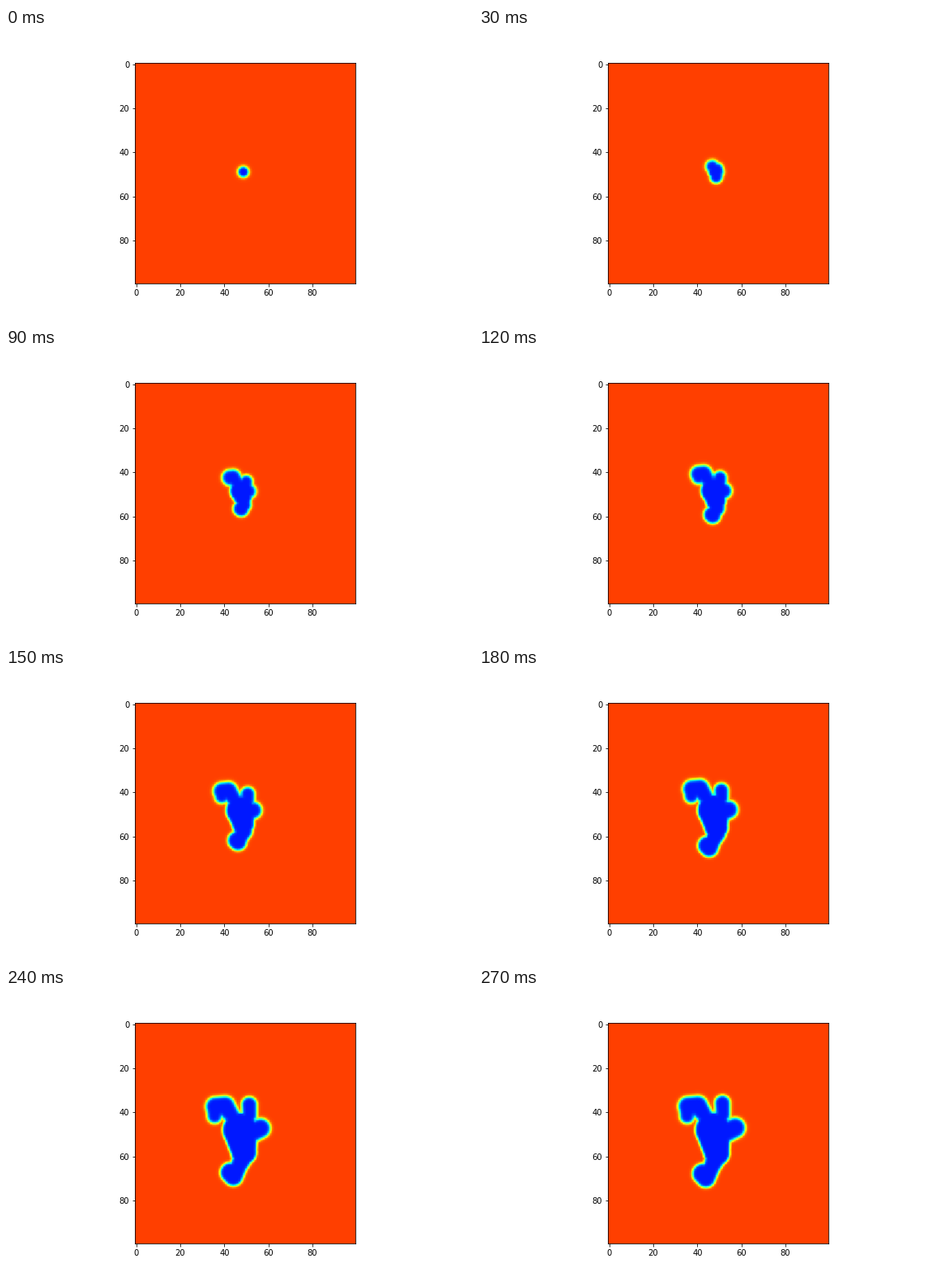
Animation, 576 px wide and 360 px high, one loop 300 ms. Source, as a matplotlib script:

```python
import numpy as np
import matplotlib.pyplot as plt
from matplotlib.animation import FuncAnimation

plt.rcParams.update({"font.family": "DejaVu Sans", "font.size": 10})

FRAMES, INTERVAL = 10, 30
SIZE = 100                # cells per side
CELL = 2.718              # stage pixels per cell
LEFT, TOP = 159.3, 43.2   # stage position of the grid corner
SEED = np.array([293.0, 177.5])
SEED_RADIUS = 6.5

# Each limb: ease-out power, interface half width, and its joints as
# (dx, dy, radius), where every joint is an offset from the one before it.
LIMBS = {
    "body": (1.8, 1.5, [(-4, -2.5, 22), (4.5, 28.5, 16)]),
    "head": (2.0, 2.2, [(-23, -32, 12.5), (-12, 0.5, 12), (-1, 12, 9)]),
    "horn": (1.5, 2.0, [(8, -21.5, 9), (-0.5, -14, 9.5)]),
    "hand": (1.3, 2.2, [(11, 0.5, 13), (12, -5.5, 12.5)]),
    "foot": (1.8, 1.8, [(0, 30.5, 12.5), (-6, 13, 10.5),
                        (-7, 13, 12), (-4, -5, 12.5)]),
}

centres = (np.arange(SIZE) + 0.5) * CELL
gx, gy = np.meshgrid(LEFT + centres, TOP + centres)


def joints(nodes, s):
    """Grow a limb out of the seed; outer joints follow later."""
    pos, chain = SEED, [(SEED, SEED_RADIUS)]
    for order, (dx, dy, r) in enumerate(nodes, start=1):
        pos = pos + np.array([dx, dy]) * s ** order
        chain.append((pos, SEED_RADIUS + (r - SEED_RADIUS) * s))
    return chain


def tapered(a, ra, b, rb):
    """Signed distance of every cell to a round stroke from a to b."""
    ab = b - a
    k = ((gx - a[0]) * ab[0] + (gy - a[1]) * ab[1]) / max(ab @ ab, 1e-9)
    k = np.clip(k, 0, 1)
    gap = np.hypot(gx - a[0] - k * ab[0], gy - a[1] - k * ab[1])
    return gap - ra - k * (rb - ra)


def phase(step):
    """Field of +1 outside and -1 inside, with a tanh interface."""
    g = step / (FRAMES - 1)
    field = np.full((SIZE, SIZE), np.inf)
    for power, edge, nodes in LIMBS.values():
        chain = joints(nodes, 1 - (1 - g) ** power)
        for (a, ra), (b, rb) in zip(chain, chain[1:]):
            field = np.minimum(field, tapered(a, ra, b, rb) / edge)
    return np.tanh(field)


fig, ax = plt.subplots(figsize=(8, 5), dpi=72)
fig.subplots_adjust(left=0.125, right=0.9, bottom=0.125, top=0.88)
image = ax.imshow(phase(0), cmap="jet", vmin=-1.43, vmax=1.46)
ax.set_xticks(range(0, SIZE, 20))
ax.set_yticks(range(0, SIZE, 20))


def draw(step):
    image.set_data(phase(step))
    return [image]


anim = FuncAnimation(fig, draw, frames=FRAMES, interval=INTERVAL,
                     repeat=True, repeat_delay=0)
plt.show()
```
